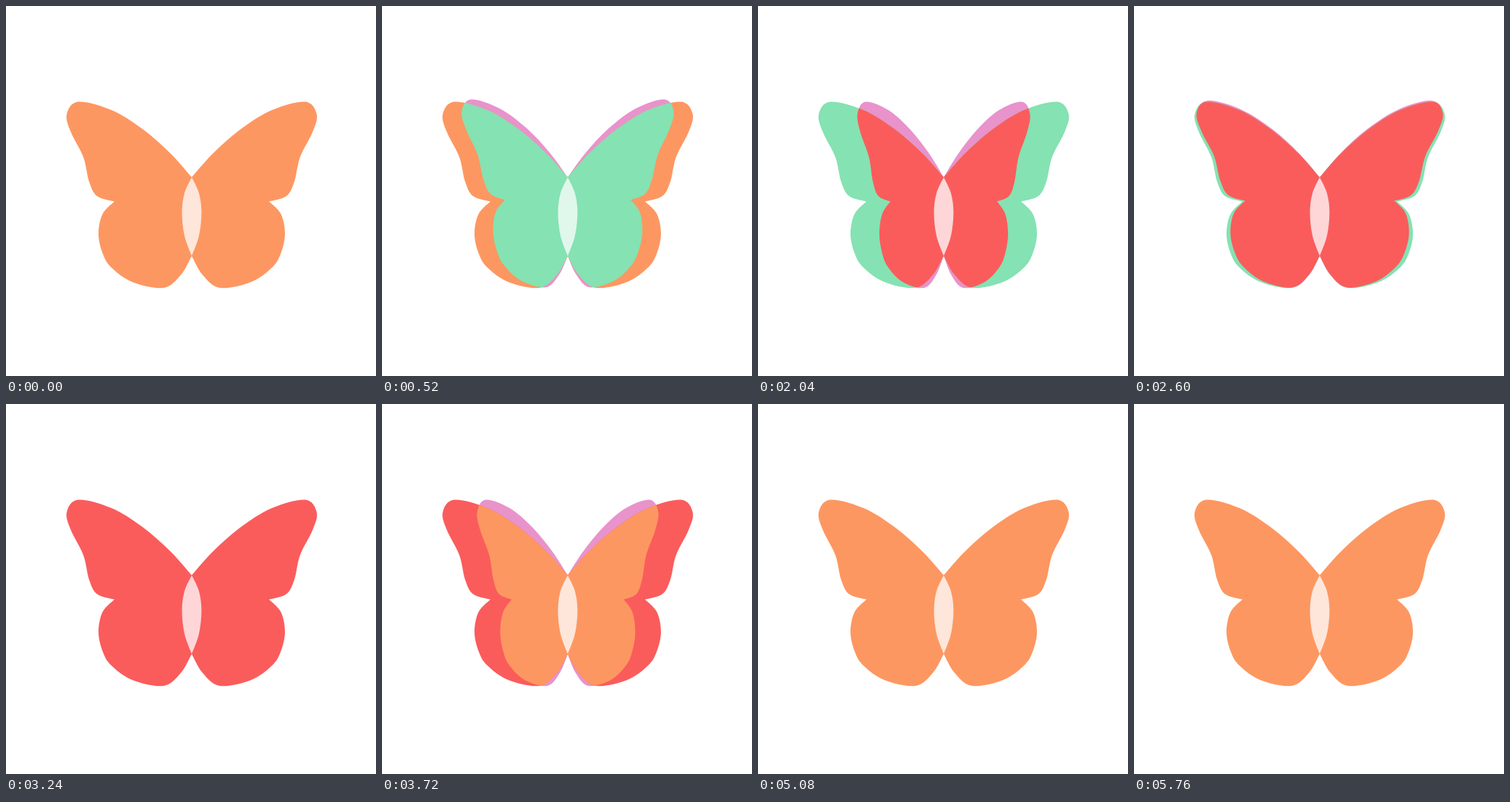
An HTML page with a canvas for the animation above (5.8 s loop, 512 by 512 pixels).

```html
<!DOCTYPE html>
<html lang="en">
<head>
<meta charset="utf-8">
<title>Butterfly</title>
<style>
html, body { margin: 0; width: 100%; height: 100%; overflow: hidden; background: #fff; }
canvas { display: block; width: 100vmin; height: 100vmin; }
</style>
</head>
<body>
<canvas id="stage" width="512" height="512"></canvas>
<script>
const ctx = document.getElementById('stage').getContext('2d');
const LOOP = 5800, STEP = 40;
const BEAT = 1650, DELAY = 90, SETTLE = 1000, EASE = 256;
const AXIS = 257, MID = 270;

const ORANGE = { wing: '#fd9761', lens: '#fee6da' };
const GREEN = { wing: '#85e2b2', lens: '#e0f7ec' };
const RED = { wing: '#fa5c5c', lens: '#fed6d8' };
const PINK = '#e893cb';
const ORDER = [ORANGE, GREEN, RED, ORANGE];

// Left wing: smooth runs that meet in corners
const TOP = [257, 237], NOTCH = [150, 270.5], FOOT = [257, 346];
const RUNS = [
  [TOP, [228, 204.5], [190, 171], [146, 144], [100, 132.5], [84, 150],
    [90, 175], [107, 209], [115, 243], [126, 263], NOTCH],
  [NOTCH, [133.5, 288], [128, 316], [134, 343], [146, 362],
    [175, 382], [218, 390], [242, 372], FOOT],
  [FOOT, [267, 318], [270.5, 286], [267, 259], TOP]
];

// The wing folds at the axis; its inner overlap stays put
function fold([x, y], { spread, lift }) {
  const reach = AXIS - x;
  if (reach <= 0) return [x, y];
  const lean = 1 - lift * (y - MID) / 9400;
  return [AXIS - reach * spread * lean, y - lift * reach / 157];
}

function spline(path, pts) {
  const at = i => pts[Math.max(0, Math.min(pts.length - 1, i))];
  const lead = (i, axis) => (at(i + 1)[axis] - at(i - 1)[axis]) / 6;
  for (let i = 0; i < pts.length - 1; i++) {
    const [ax, ay] = at(i), [bx, by] = at(i + 1);
    path.bezierCurveTo(ax + lead(i, 0), ay + lead(i, 1),
      bx - lead(i + 1, 0), by - lead(i + 1, 1), bx, by);
  }
}

function makePair(pose) {
  const [left, right] = [false, true].map(mirror => {
    const path = new Path2D();
    path.moveTo(...TOP);
    for (const run of RUNS) {
      spline(path, run.map(p => {
        const [x, y] = fold(p, pose);
        return [mirror ? 2 * AXIS - x : x, y];
      }));
    }
    path.closePath();
    return path;
  });
  return { left, right };
}

function poseAt(t) {
  const spread = 1 - Math.exp(-Math.max(0, t - DELAY) / EASE);
  const late = Math.max(0, (spread - 0.73) / 0.27);
  return { spread, lift: 4 * Math.sin(Math.PI * late) };
}

function fillPair(pair, color) {
  ctx.fillStyle = color;
  ctx.fill(pair.left);
  ctx.fill(pair.right);
}

function fillLens(pair, color) {
  ctx.save();
  ctx.clip(pair.left);
  ctx.fillStyle = color;
  ctx.fill(pair.right);
  ctx.restore();
}

const open = makePair({ spread: 1, lift: 0 });

function draw(time) {
  const t = Math.floor((time % LOOP) / STEP) * STEP;
  const beat = Math.min(Math.floor(t / BEAT), ORDER.length - 1);
  const phase = t - beat * BEAT;
  const next = ORDER[beat + 1];
  const moving = next && phase > DELAY && phase < SETTLE;
  const base = next && phase >= SETTLE ? next : ORDER[beat];
  const flap = moving && makePair(poseAt(phase));

  ctx.fillStyle = '#fff';
  ctx.fillRect(0, 0, 512, 512);
  if (moving) fillPair(flap, PINK);
  fillPair(open, base.wing);
  fillLens(open, base.lens);
  if (!moving) return;

  for (const side of [open.left, open.right]) {
    ctx.save();
    ctx.clip(side);
    fillPair(flap, next.wing);
    ctx.restore();
  }
  fillLens(flap, next.lens);
}

const began = performance.now();
function tick() {
  draw(performance.now() - began);
  requestAnimationFrame(tick);
}
tick();
</script>
</body>
</html>
```
